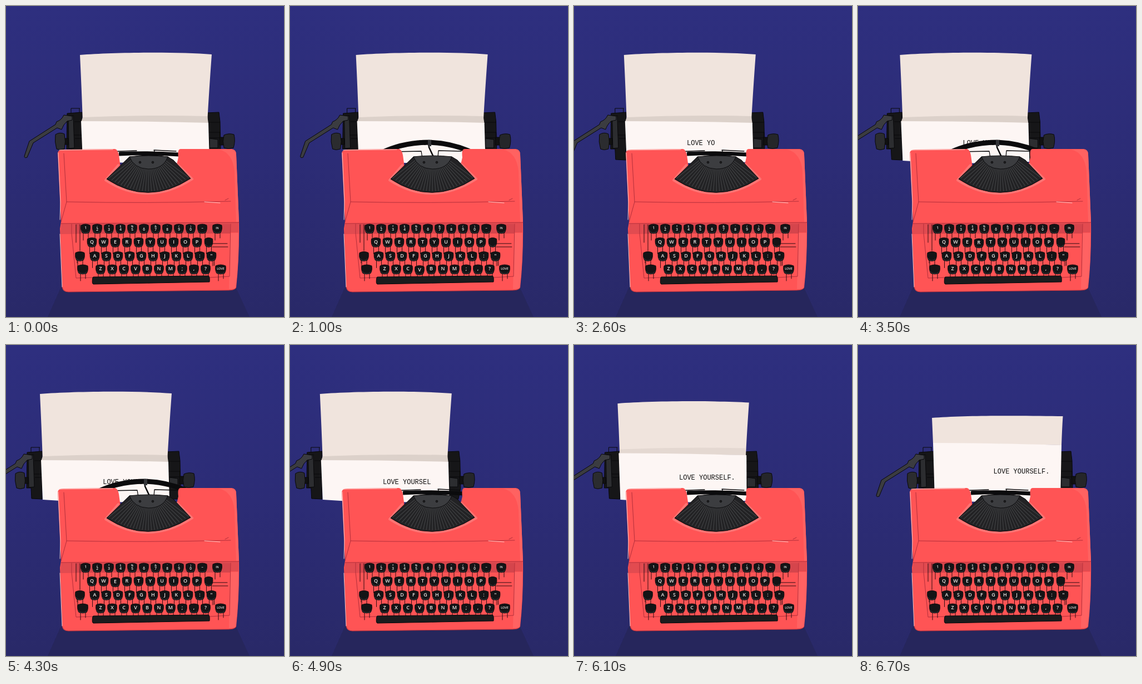
Animation of 500 by 559 pixels, one loop 9.7 s. Source, as an HTML page:

```html
<!DOCTYPE html>
<html lang="en">
<head>
<meta charset="utf-8">
<title>Typewriter</title>
<style>
html, body { margin: 0; width: 100%; height: 100%; overflow: hidden; background: #2b2b72; }
svg { display: block; width: 100vw; height: 100vh; }
.typed { font: 12px "Liberation Mono", "Courier New", monospace; fill: #111; white-space: pre; }
.label { font-family: "Open Sans", Lato, sans-serif; font-weight: 600; fill: #ece7e5; text-anchor: middle; }
.line { fill: none; stroke-linecap: round; stroke-linejoin: round; }
</style>
</head>
<body>
<svg viewBox="0 0 500 559" preserveAspectRatio="none">
  <defs>
    <linearGradient id="wall" x2="0" y2="1">
      <stop offset="0" stop-color="#2e2f7f"/>
      <stop offset=".5" stop-color="#2c2c76"/>
      <stop offset="1" stop-color="#292968"/>
    </linearGradient>
  </defs>
  <rect width="500" height="559" fill="url(#wall)"/>
  <path d="M99 505L75 559H438L413 505Z" fill="#26265c"/>

  <g id="carriage">
    <g stroke="#08080a" stroke-width="1">
      <path d="M117 192V184H133M132 184V192" fill="none"/>
      <path d="M110 193L137 191V277L118 276L117 257H109Z" fill="#161618"/>
      <path d="M112 200L121 197L123 255L113 256Z" fill="#2c2d30"/>
      <path d="M123 208H136M122 232H136M124 238H136" fill="none"/>
      <path d="M105 238H112V249H105Z" fill="#111"/>
      <path d="M89 231Q97 226 105 230Q108 244 105 257Q97 260 91 257Q87 244 89 231Z" fill="#2b2c2f"/>
      <path d="M360 192L383 191L385 208L386 258L382 277H361Z" fill="#161618"/>
      <path d="M363 209H385M364 227H385V237H365" fill="none"/>
      <path d="M366 238L381 240V255H366Z" fill="#2c2d30"/>
      <path d="M384 236H393V250H384Z" fill="#111"/>
      <path d="M392 232Q401 228 410 231Q413 243 409 255Q400 258 392 255Q389 243 392 232Z" fill="#252629"/>
      <path d="M104 196L119 198V205L110 207Q103 213 100 222L92 219L49 246L38 272Q33 274 33 270L42 243L89 213L91 208Q100 205 104 196Z" fill="#3b3c40"/>
    </g>
    <path id="flap" fill="#f0e4dd"/>
    <path id="fold" d="M138 200Q250 195 362 198L364 211L135 209Z" fill="#dcd1ca"/>
    <path id="sheet" fill="#fdf6f4"/>
    <text id="typed" class="typed"></text>
  </g>

  <g id="rest" class="line" stroke="#0b0b0d">
    <path d="M203 266Q255 263 311 267" stroke-width="7" stroke-linecap="butt"/>
    <path d="M178 262L235 260M205 262L268 264L266 259L306 261" stroke-width="1.3"/>
    <path d="M222 274Q255 264 292 273" stroke-width="3"/>
  </g>
  <g id="strike" class="line" stroke="#0b0b0d">
    <path d="M183 262L236 261L238 273M266 272L267 260L308 261" stroke-width="1.3"/>
    <path d="M168 262Q206 245 250 245Q290 246 325 262" stroke-width="9"/>
    <path d="M250 242V254L258 271" stroke-width="2.5"/>
    <path d="M251 241V252" stroke="#333438" stroke-width="6" stroke-linecap="butt"/>
  </g>

  <path d="M93 264Q94 258 103 258L196 257Q201 258 203 268L206 290H306L310 272Q308 257 314 257L406 257Q414 258 414 267L419 388Q420 450 414 506Q412 511 400 511L112 514Q101 514 101 504L97 400L99 388Z" fill="#ff5455"/>
  <path d="M384 258H406Q414 258 414 267L419 388L414 389L411 296Q407 264 384 258Z" fill="#ff6261"/>
  <path d="M403 408H418Q419 460 413 508L401 509Z" fill="#ff6262"/>
  <path d="M99 391L418 389V407L98 410Z" fill="#e24b50"/>
  <path d="M126 392H403V409H126Z" fill="#d5454c"/>
  <g class="line" stroke="#b32f3b" stroke-width="1">
    <path d="M104 265L109 352L99 388M109 352Q250 355 404 351M99 391L419 389M118 392L118 408L126 489L156 488M404 392L402 486L366 488"/>
    <path d="M101 505Q103 514 112 514L400 511Q412 511 414 506M394 349L400 346"/>
  </g>
  <g class="line" stroke="#ffd3ce" stroke-width=".9">
    <path d="M94 264L98 352L97 384M96 259L192 258M97 410L101 505M357 352L385 354"/>
  </g>
  <path d="M202 286L179 313Q255 362 335 311L308 284" class="line" stroke="#ff7574" stroke-width="4"/>
  <path d="M222 271L181 311Q255 360 332 310L301 277L291 271Z" fill="#222224" stroke="#0b0b0d"/>
  <g id="ribs" class="line" stroke="#3d3e40" stroke-width="1.4"></g>
  <path d="M222 271Q256 267 291 271Q283 293 256 293Q230 292 222 271Z" fill="#3c3d40" stroke="#0b0b0d"/>
  <g fill="#222" stroke="#0b0b0d"><circle cx="241" cy="281" r="1.8"/><circle cx="264" cy="281" r="1.8"/></g>

  <g id="stems" class="line" stroke="#2a0d13" stroke-width="1">
    <path d="M126 393V425M133 393V440M372 427H398M371 433H399M128 455V462M372 457V467"/>
  </g>
  <g id="keys"></g>
  <path id="space" d="M157 487L364 485Q367 486 366 496L157 500Q154 499 156 488Z" fill="#1b1b1d" stroke="#08080a"/>
</svg>
<script>
const $ = id => document.getElementById(id);
const NS = "http://www.w3.org/2000/svg";
function add(parent, tag, attrs, text) {
  const el = document.createElementNS(NS, tag);
  for (const k in attrs) el.setAttribute(k, attrs[k]);
  if (text) el.textContent = text;
  return parent.appendChild(el);
}

// Ribs of the type basket
for (let i = 0; i <= 26; i++) {
  const u = i / 26, v = 1 - u;
  const x = 185 * v * v + 2 * 256 * u * v + 328 * u * u;
  const y = 309 * v * v + 2 * 356 * u * v + 308 * u * u;
  add($("ribs"), "path", { d: `M${226 + 60 * u} ${277 + 60 * u * v}L${x} ${y}` });
}

// Keyboard
const keys = {};
function addKey(x, y, label, size, w = 8, upper) {
  add($("stems"), "path", { d: `M${x - 4} ${y + 8}v13M${x + 5} ${y + 8}v9` });
  const g = add($("keys"), "g", {});
  add(g, "path", {
    d: `M${x - w} ${y - 6}Q${x} ${y - 10} ${x + w} ${y - 6}Q${x + w + 1.5} ${y + 2} ${x + w - 2} ${y + 7.5}Q${x} ${y + 10.5} ${x - w + 2} ${y + 7.5}Q${x - w - 1.5} ${y + 2} ${x - w} ${y - 6}Z`,
    fill: "#141416", stroke: "#060607", "stroke-width": .8
  });
  add(g, "path", {
    d: `M${x - w + 1} ${y + 4}Q${x - w + 3} ${y + 8} ${x} ${y + 8}T${x + w - 2} ${y + 5}`,
    class: "line", stroke: "#4a4b4f", "stroke-width": .8
  });
  const text = (str, size, dy) =>
    add(g, "text", { x, y: y + size * .36 + dy, class: "label", "font-size": size }, str);
  if (upper) text(upper, 5, -4);
  if (label) text(label, size, upper ? 2 : -1);
  keys[label] = g;
}
const row = (chars, x, y, size, uppers = "") => [...chars].forEach((c, i) =>
  addKey(x + i * 21, y, c.trim(), size, 8, (uppers[i] || "").trim()));
row("1234567890–", 143, 400, 6.5, " ¿*$%_&'()");
addKey(380, 400, "IN", 5);
row("QWERTYUIOP", 154.5, 424.5, 9);
addKey(364.5, 424.5, "", 0, 7);
addKey(133, 449.5, "", 0);
row("ASDFGHJKL:\"", 159.5, 449.5, 9);
addKey(138, 473, "", 0, 9);
row("ZXCVBNM;,?", 170, 473, 9);
addKey(386, 473, "LOVE", 5.5, 9);
keys["."] = keys[":"];
keys[" "] = $("space");

// One entry per drawn step: how long it stays and what it shows
const MESSAGE = "LOVE YOURSELF.", PITCH = 7.2, REACH = 91;
const steps = [];
const step = (ms, state) => steps.push({ ms, shift: 0, count: 0, slip: 0, feed: 0, ...state });
step(200, {});
[...MESSAGE].forEach((key, i) => {
  const shift = Math.min(i * PITCH, REACH), slip = i * PITCH - shift;
  const here = { shift, slip };
  if (key === " ") return step(200, { ...here, count: i + 1, key });
  step(200, { ...here, count: i, key, hit: true });
  step(i === 7 ? 500 : 200, { ...here, count: i + 1 });
});
for (let k = 1; k <= 5; k++) {
  const feed = k / 5;
  step(k === 5 ? 3000 : 200, { shift: REACH * (1 - feed), slip: 2.6, count: MESSAGE.length, feed });
}
const LOOP = steps.reduce((sum, s) => sum + s.ms, 0);

function drawPaper(p) {
  const mix = (a, b) => a + (b - a) * p;
  const top = mix(88, 131), left = mix(208, 177), right = mix(210, 180);
  $("flap").setAttribute("d",
    `M133 ${top}C195 ${mix(83, 126)} 310 ${mix(82, 127)} ${mix(370, 368.5)} ${mix(87, 128)}` +
    `Q${mix(365, 367)} ${mix(155, 150)} ${mix(362, 366)} ${right}L${mix(138, 135)} ${left}Q${mix(136, 134)} ${mix(150, 152)} 133 ${top}Z`);
  $("sheet").setAttribute("d",
    `M135 ${left - 1}Q${mix(250, 220)} ${left - 1} ${mix(364, 366)} ${right}L${mix(366, 364)} 280Q250 286 138 278Z`);
  $("fold").setAttribute("transform", `translate(0 ${left - 208})`);
  $("fold").setAttribute("opacity", 1 - p);
  $("typed").setAttribute("y", mix(249.5, 230.5));
}

let shown;
function draw(s) {
  if (shown && shown.key) keys[shown.key].removeAttribute("transform");
  if (s.key) keys[s.key].setAttribute("transform", "translate(0 1.5)");
  $("carriage").setAttribute("transform", `translate(${-s.shift} 0)`);
  $("typed").setAttribute("x", 246.2 - s.slip);
  $("typed").textContent = MESSAGE.slice(0, s.count);
  $("strike").style.display = s.hit ? "" : "none";
  $("rest").style.display = s.hit ? "none" : "";
  drawPaper(s.feed);
  shown = s;
}

function tick() {
  let t = performance.now() % LOOP, i = 0;
  while (t >= steps[i].ms) t -= steps[i++].ms;
  if (steps[i] !== shown) draw(steps[i]);
  requestAnimationFrame(tick);
}
tick();
</script>
</body>
</html>
```
